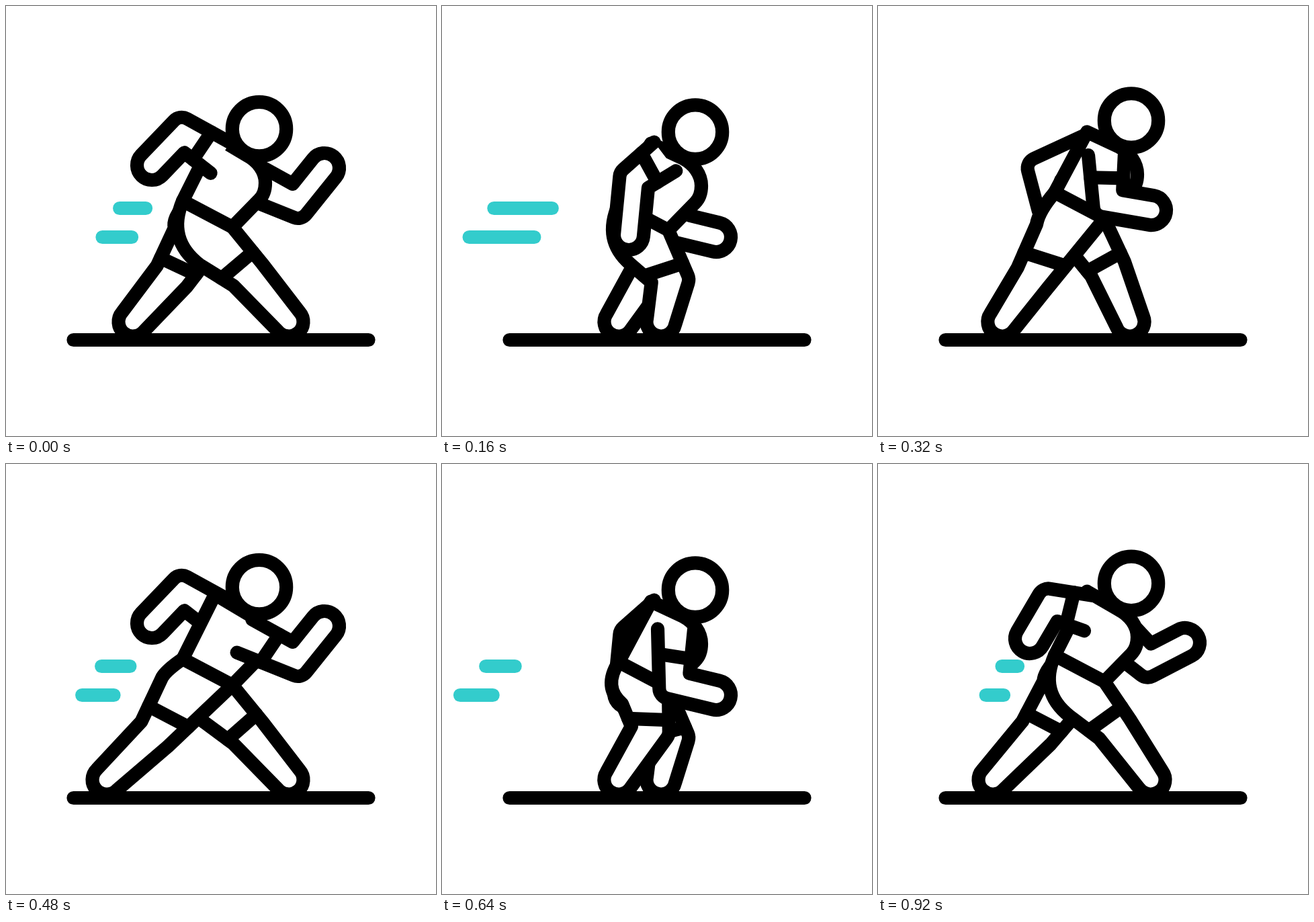
Write an HTML page with a canvas that moves like this. It is 640 by 640 pixels and loops after 0.96 s.

```html
<!DOCTYPE html>
<html lang="en">
<head>
<meta charset="utf-8">
<title>Runner</title>
<style>
  html, body { margin: 0; width: 100%; height: 100%; overflow: hidden; background: #fff; }
  canvas { display: block; width: 640px; height: 640px; }
</style>
</head>
<body>
<canvas id="stage" width="640" height="640"></canvas>
<script>
const ctx = document.getElementById('stage').getContext('2d');
const LOOP = 960, HALF = LOOP / 2, STEP = 40;
const FOOT_Y = 470;

// Joints of one side of the body; the other side runs half a loop later
const stride = [
  { at: 0,   shoulder: [319, 226], elbow: [262, 190], hand: [217, 237], knee: [360, 400], foot: [421] },
  { at: 160, shoulder: [332, 224], elbow: [286, 259], hand: [278, 341], knee: [340, 409], foot: [326] },
  { at: 320, shoulder: [340, 221], elbow: [343, 293], hand: [407, 304], knee: [230, 405], foot: [185] },
  { at: 440, shoulder: [353, 250], elbow: [403, 294], hand: [457, 266], knee: [236, 400], foot: [171] },
  { at: 480, shoulder: [355, 256], elbow: [433, 292], hand: [474, 241], knee: [247, 402], foot: [189] },
  { at: 640, shoulder: [348, 246], elbow: [346, 329], hand: [408, 344], knee: [310, 397], foot: [263] },
  { at: 800, shoulder: [314, 219], elbow: [246, 246], hand: [260, 299], knee: [342, 391], foot: [375] },
  { at: 920, shoulder: [313, 222], elbow: [256, 209], hand: [226, 260], knee: [352, 394], foot: [406] }
];

const near = { stretch: 1, tuck: 0, hemFront: 0.68, hemBack: 0.65, cuff: true };
const far = { stretch: 0, tuck: 8, hemFront: 0.8, hemBack: 0.8, cuff: false };

const wind = [{ y: 301, from: 208, to: 59 }, { y: 344, from: 187, to: 20 }];
const gusts = [
  { head: 343, headTime: 310, tail: 430, tailTime: 315, ease: 1 },
  { head: 800, headTime: 345, tail: 965, tailTime: 310, ease: 1.75 }
];

const mix = (a, b, k) => a + (b - a) * k;
const between = (p, q, k) => [mix(p[0], q[0], k), mix(p[1], q[1], k)];
const offset = (p, n, d) => [p[0] + n[0] * d, p[1] + n[1] * d];

// Unit normal of p -> q, on the side given by the sign
function normal(p, q, side) {
  const dx = q[0] - p[0], dy = q[1] - p[1], k = side / Math.hypot(dx, dy);
  return [-dy * k, dx * k];
}

// Smooth periodic curve through the stride
function joint(name, t) {
  const n = stride.length;
  const time = i => stride[(i + n) % n].at + LOOP * Math.floor(i / n);
  const value = (i, j) => stride[(i + n) % n][name][j];
  let i = n - 1;
  while (stride[i].at > t) i--;
  const h = time(i + 1) - time(i), u = (t - time(i)) / h;
  const slope = (k, j) => {
    const h0 = time(k) - time(k - 1), h1 = time(k + 1) - time(k);
    const d0 = (value(k, j) - value(k - 1, j)) / h0, d1 = (value(k + 1, j) - value(k, j)) / h1;
    return (d0 * h1 + d1 * h0) / (h0 + h1);
  };
  return stride[i][name].map((a, j) =>
    mix(a, value(i + 1, j), u * u * (3 - 2 * u))
    + h * u * (1 - u) * ((1 - u) * slope(i, j) - u * slope(i + 1, j)));
}

function paint() {
  ctx.fill();
  ctx.stroke();
}

function line(p, q) {
  ctx.beginPath();
  ctx.moveTo(...p);
  ctx.lineTo(...q);
  ctx.stroke();
}

// Traces a bent tube from its outer root to the inner side of its joint
function tube(root, start, bend, end, width, r, side) {
  const n1 = normal(root, bend, side), n2 = normal(bend, end, side);
  const sum = [n1[0] + n2[0], n1[1] + n2[1]];
  const miter = 2 * width / (sum[0] ** 2 + sum[1] ** 2);
  const outer = offset(bend, sum, miter), inner = offset(bend, sum, -miter);
  const a = Math.atan2(n2[1], n2[0]);
  ctx.beginPath();
  ctx.moveTo(...start);
  ctx.arcTo(...outer, ...offset(end, n2, r), 16);
  ctx.arc(...end, r, a, a + Math.PI, side > 0);
  ctx.lineTo(...inner);
  return { outer, inner };
}

function arm(t, { cuff }) {
  const shoulder = joint('shoulder', t), elbow = joint('elbow', t), hand = joint('hand', t);
  const n = normal(shoulder, elbow, 1);
  const top = offset(shoulder, n, 27), pit = offset(shoulder, n, -27);
  const { outer, inner } = tube(shoulder, top, elbow, hand, 22, 22, 1);
  ctx.lineTo(...pit);
  paint();
  if (cuff) line(between(top, outer, 0.37), between(pit, inner, 0.67));
}

function leg(t, bob, { stretch, tuck, hemFront, hemBack }) {
  const push = stretch * Math.max(0, -Math.cos(t / LOOP * 2 * Math.PI)) ** 8;
  const [kx, ky] = joint('knee', t);
  const knee = [kx - 26 * push, ky];
  const foot = [joint('foot', t)[0] - 39 * push, FOOT_Y];
  const hip = [337, 329 + bob], rear = [263 + tuck, 290 + bob];
  const thigh = [144 + tuck + 0.4 * knee[0], ky - 195 + 0.5 * knee[0]];
  const { outer, inner } = tube([300, 310 + bob], hip, knee, foot, 27, 21.5, -1);
  ctx.lineTo(...thigh);
  ctx.quadraticCurveTo(rear[0] - 24, mix(rear[1], thigh[1], 0.6), ...rear);
  paint();
  line(between(hip, outer, hemFront), between(thigh, inner, hemBack));
}

function body(bob, lift) {
  ctx.save();
  ctx.translate(0, bob);
  ctx.beginPath();
  ctx.moveTo(311, 200 - lift);
  ctx.lineTo(358, 222);
  ctx.bezierCurveTo(375, 231, 386, 246, 386, 263);
  ctx.bezierCurveTo(386, 275, 383, 282, 377, 288);
  ctx.lineTo(337, 329);
  ctx.lineTo(263, 290);
  ctx.closePath();
  paint();
  ctx.beginPath();
  ctx.arc(377, 183, 40.2, 0, 2 * Math.PI);
  paint();
  ctx.restore();
}

function speedLines(t) {
  const now = t < gusts[0].head ? t + LOOP : t;
  for (const { head, headTime, tail, tailTime, ease } of gusts) {
    if (now < head || now >= tail + tailTime) continue;
    const part = (start, time) => Math.min(1, Math.max(0, (now - start) / time)) ** ease;
    for (const { y, from, to } of wind) {
      line([mix(from, to, part(head, headTime)), y],
        [mix(from, to, part(tail, tailTime)) + 0.01, y]);
    }
  }
}

function draw(t) {
  const other = (t + HALF) % LOOP;
  const phase = t / HALF * 2 * Math.PI;
  const bob = -2.6 + 10.3 * Math.sin(phase + 0.27);
  ctx.fillStyle = '#fff';
  ctx.fillRect(0, 0, 640, 640);
  ctx.lineWidth = 20.2;
  ctx.lineCap = ctx.lineJoin = 'round';
  ctx.strokeStyle = '#33cccc';
  speedLines(t);
  ctx.strokeStyle = '#000';
  arm(other, far);
  leg(other, bob, far);
  leg(t, bob, near);
  body(bob, 6 * Math.max(0, Math.cos(phase)));
  arm(t, near);
  line([100.5, 497], [539.5, 497]);
}

const begin = performance.now();
function tick() {
  const t = (performance.now() - begin) % LOOP;
  draw(Math.floor(t / STEP) * STEP);
  requestAnimationFrame(tick);
}
tick();
</script>
</body>
</html>
```
